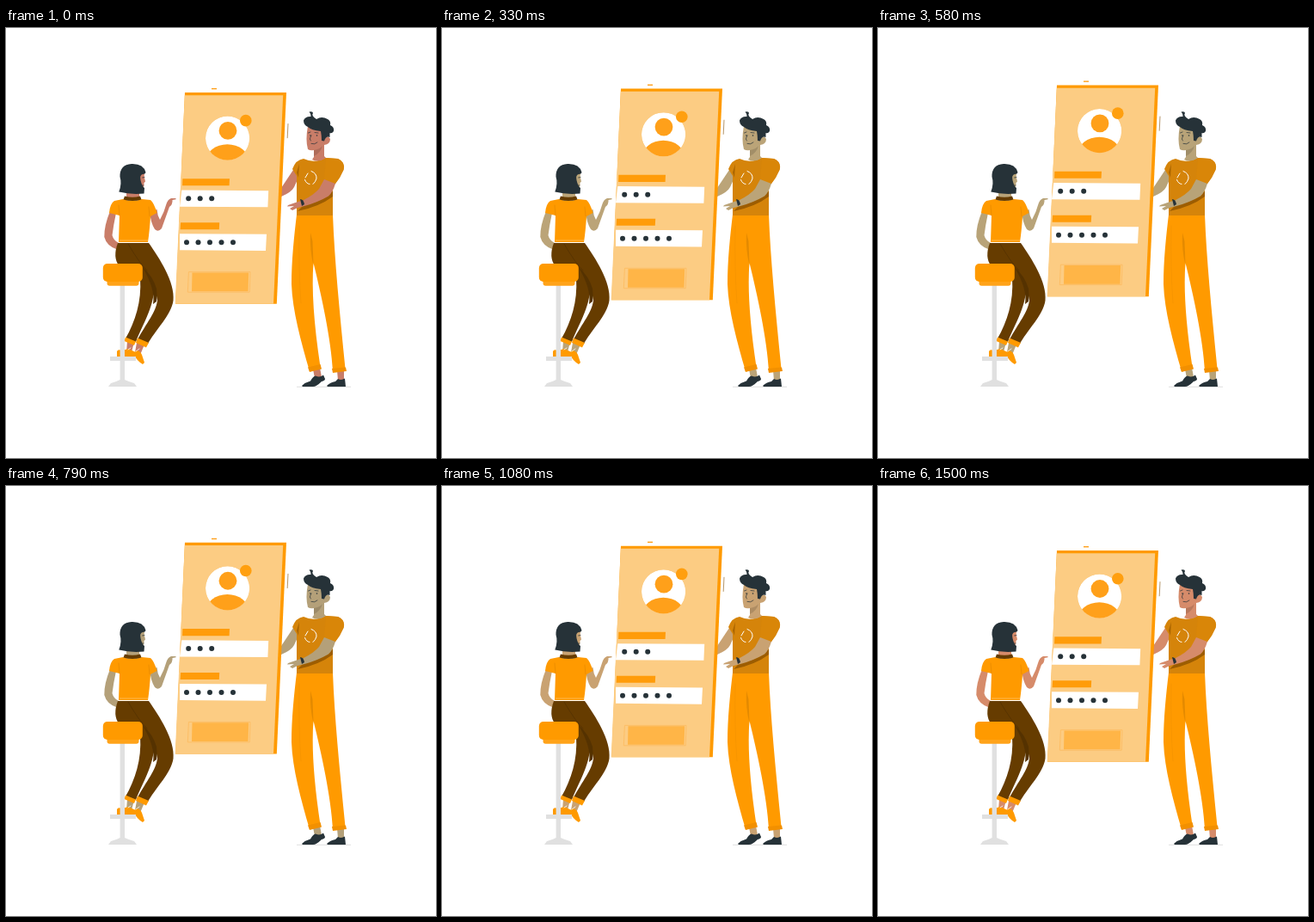
Animation of 500 by 500 pixels, one loop 1.54 s. Source, as an HTML page:

```html
<!DOCTYPE html>
<html lang="en">
<head>
<meta charset="utf-8">
<title>Login screen</title>
<style>
html, body { margin: 0; width: 100%; height: 100%; overflow: hidden; background: #fff; }
svg { display: block; width: 100vw; height: 100vh; }
.skin { fill: var(--skin); }
.orange { fill: #ff9a00; }
.dark { fill: #263238; }
.brown { fill: #663c00; }
.grey { fill: #e0e0e0; }
.line { fill: none; stroke-linecap: round; stroke-linejoin: round; }
</style>
</head>
<body>
<svg viewBox="0 0 500 500">
  <g id="man">
    <path d="M338 417.3H401" stroke="#d8d8d8" stroke-width=".8"/>
    <path class="skin" d="M334 165L320 186V196Q332 191 335 185L342 170Z"/>
    <path class="skin" d="M357 397L359 407L367 406L365 395ZM385 398L386 410L393 409V397Z"/>
    <path class="dark" d="M344 416Q348 412 354 410.5Q357 405 360 404.5Q365 407 369 403.5L371 408Q371 410 367 411Q361 417 357 417H345ZM373 416Q377 412 383 411L386 408Q390 410 394 407.5L395 417H374Z"/>
    <path class="orange" d="M338 217H380C382 270 388 330 394.5 396L380 399C378 362 367 312 357.5 273Q354 318 365.5 394L353 399C343 365 333 328 332 298C332 270 335 242 338 217Z"/>
    <path d="M354 238Q353 258 357.5 276L356.5 248Z" fill="#e48a00"/>
    <path d="M341 230Q340 280 343 320" class="line" stroke="#ef9000" stroke-width=".5"/>
    <path d="M351 394.5L365.5 391L367 396.5L353 400ZM379 396L395 394.5L396 399L380 401Z" fill="#f29000"/>
    <path d="M346 152Q359 158 371 151L386 152Q395 156 392.5 165Q388 174 383 181L380 183V218H338V172L333 164Q337 153 346 152Z" fill="#d5840a"/>
    <path d="M372 151L386 152Q395 156 392.5 165Q389 174 383 181L370 176Z" fill="#d98608"/>
    <path d="M338 168L341 158L340 174Z" fill="#a96500"/>
    <path d="M339 213Q364 208 380 196V190L347 205Z" fill="#9d5d00"/>
    <path class="line" d="M355 166.5Q361.5 169 361 175Q360 179 357 181.5M353 181.5Q349 181 347.5 176.5M348 174L351 169" stroke="#fff" stroke-width="1"/>
    <path class="skin" d="M370 176L383 181Q380 191 375 195.5Q362 203 347 207L339 209L333 212L330 210L335 207L327 207.5L328 206L338 202.5L346 200Q358 194 364 187Z"/>
    <path class="dark" d="M342 199Q346 199 347 205L344 207Z"/>
    <path class="skin" d="M351 114Q348 130 351 141Q354 143 358 142V150L356 153Q363 157 372 151L370 149V136Q377 135 377 129Q375 125 371 127L372 114Z"/>
    <path d="M358 142Q365 141 368 137Q366 145 358 149Z" fill="#0002"/>
    <path class="dark" d="M352.5 97.5Q357 96.5 357 99Q354.5 102 361 106Q367 102 374 106Q378 108 377 113Q382 115 381 120Q379 123 376.5 122V127Q372 125 370 131.5L367 131Q367 125 366 120Q355 119 351 115Q346 113 346 107.5Q348 102.5 354.5 103Q355 100 352.5 97.5Z"/>
    <path class="line" d="M351.5 122L354 121M359 121.5L363 122M355 125Q352 130 354.5 131M355 134.5Q359 136 362 133" stroke="#263238" stroke-width=".7"/>
    <circle class="dark" cx="354" cy="125" r=".8"/>
    <circle class="dark" cx="361.5" cy="125" r=".8"/>
  </g>

  <g id="phone">
    <path class="orange" d="M208 74.8H326L314.8 320.5H197.2Z"/>
    <path d="M207.8 78H322.2L311 320.5H196.7Z" fill="#fccc83"/>
    <path d="M239 70.5H245" stroke="#ffa01a" stroke-width="1.4"/>
    <path d="M328 111L327.2 128" stroke="#ad8b58" stroke-width=".9"/>
    <clipPath id="disc"><circle cx="257.6" cy="128" r="25.6"/></clipPath>
    <g clip-path="url(#disc)">
      <circle cx="257.6" cy="128" r="25.6" fill="#fff"/>
      <ellipse cx="257.4" cy="155" rx="25" ry="20" fill="#ffa01a"/>
    </g>
    <circle cx="258" cy="119.3" r="10.4" fill="#ffa01a"/>
    <circle cx="278.8" cy="107.5" r="6.8" fill="#ff9f0f"/>
    <path d="M205.3 175H260L259.6 183.2H205ZM203 226H248.2L247.8 234H202.6Z" fill="#ff9c0a"/>
    <path d="M204.3 188.3L305.2 189L304.4 208L202 207.5ZM202 239L303 239.6L302 258.8L202 258Z" fill="#fff"/>
    <g id="dots" class="dark"></g>
    <path d="M212.4 283.5H284L283.2 307H211.3Z" fill="none" stroke="#fdbd62" stroke-width=".9"/>
    <path d="M216.5 284.4H282.2L281.5 306H216Z" fill="#ffb547"/>
  </g>

  <g id="woman">
    <path class="skin" d="M141 364L140 377L146 377L149 365ZM152 366L150 377L156 380L161 368Z"/>
    <path class="orange" d="M129 376Q130 373 135 375L142 373L151 377L152 382H129ZM151 375Q156 375 158 380L161 389L159 391Q152 387 149 380Z"/>
    <path class="line" d="M142 374L145 372M151 376L155 373" stroke="#fff" stroke-width=".8"/>
    <path class="skin" d="M121 213Q114 230 114.3 243Q117 253 128 257L131 250Q125 247 123.5 241Q125 229 128 215Z"/>
    <path class="skin" d="M167 213L175.5 211Q176 218 179 223Q184 214 186 206Q188 199 192 198L197.5 198V199.3L193.5 200Q194 205 190 208L181 233Q177 238 173 234Q168 226 167 213Z"/>
    <path class="brown" d="M130 250H166C178 267 197 296 194.5 317C192 334 173 352 164.5 368L152.5 363C164 342 174 331 176 317Q174 304 171 297C176 318 158 346 151 365L139 361C150 342 158 318 156 291L151 276H131Q124 266 130 250Z"/>
    <path d="M158 277Q171 289 175 303Q176 311 175 318L171 321Q174 303 158 277Z" fill="#553200"/>
    <path class="line" d="M142 251Q154 272 164 282" stroke="#553200" stroke-width=".8"/>
    <path d="M139 359.5L151 364.5L149 369L137.5 364ZM153 360.5L166 366L163 371.5L151 366Z" class="orange"/>
    <path class="orange" d="M136 199Q147 203 158 199L168 200Q172 203 175.5 215L168 219Q167 236 165 249H131L132 218L120 215Q121 204 126 201Z"/>
    <path d="M132 247H165" stroke="#ffb64a" stroke-width="1"/>
    <path d="M132 218L131 206M167 219L166 208" class="line" stroke="#df8500" stroke-width=".6"/>
    <path class="skin" d="M140 188H155V198H140Z"/>
    <path class="brown" d="M138 195.5Q147 198 156 195.5L157.5 199.5Q147 202.5 136.5 199.5Z"/>
    <path class="skin" d="M153 167H161Q160 173 162 178.5L160.5 180Q161 187 156 187H152Z"/>
    <path class="dark" d="M131.3 190.5Q135 181 132.5 173Q132 159 146 158Q160 157.5 162.5 168Q162 170 159 170Q155 171 156.5 177Q158 184 161 186L160.5 192.5Q145 194 131.3 190.5Z"/>
    <path class="line" d="M158.5 174L161 173.5M158.5 183H160" stroke="#263238" stroke-width=".7"/>
  </g>

  <g id="stool">
    <path class="grey" d="M132.6 298H138V409Q142 411 149 413L152 417H119L122 413Q129 411 132.6 409ZM121 382H151V387H121Z"/>
    <rect x="117.5" y="292" width="37" height="7.7" rx="3" fill="#ffa31a"/>
    <rect class="orange" x="112.8" y="274" width="46" height="21" rx="5"/>
  </g>
</svg>
<script>
const LOOP = 1540;
const skinTones = [
  [0, 201, 125, 104], [330, 187, 164, 120], [580, 184, 163, 120],
  [790, 180, 160, 121], [1080, 201, 162, 114], [1290, 223, 186, 128],
  [1500, 214, 139, 106], [LOOP, 201, 125, 104]
];
const phone = document.getElementById("phone");

function addDots(count, x, y) {
  for (let i = 0; i < count; i++) {
    const dot = document.createElementNS("http://www.w3.org/2000/svg", "circle");
    dot.setAttribute("cx", x + i * 13.5);
    dot.setAttribute("cy", y);
    dot.setAttribute("r", 3);
    document.getElementById("dots").append(dot);
  }
}

function skinAt(t) {
  const i = skinTones.findIndex(tone => tone[0] > t);
  const a = skinTones[i - 1], b = skinTones[i];
  const k = (t - a[0]) / (b[0] - a[0]);
  return `rgb(${[1, 2, 3].map(c => Math.round(a[c] + (b[c] - a[c]) * k))})`;
}

function draw() {
  const t = performance.now() % LOOP;
  const lift = 4.7 * (Math.cos((t + 40) / LOOP * 2 * Math.PI) - 1) + 0.2;
  phone.setAttribute("transform", `translate(0 ${lift.toFixed(2)})`);
  document.documentElement.style.setProperty("--skin", skinAt(t));
  requestAnimationFrame(draw);
}

addDots(3, 212.2, 198);
addDots(5, 210, 249);
draw();
</script>
</body>
</html>
```
